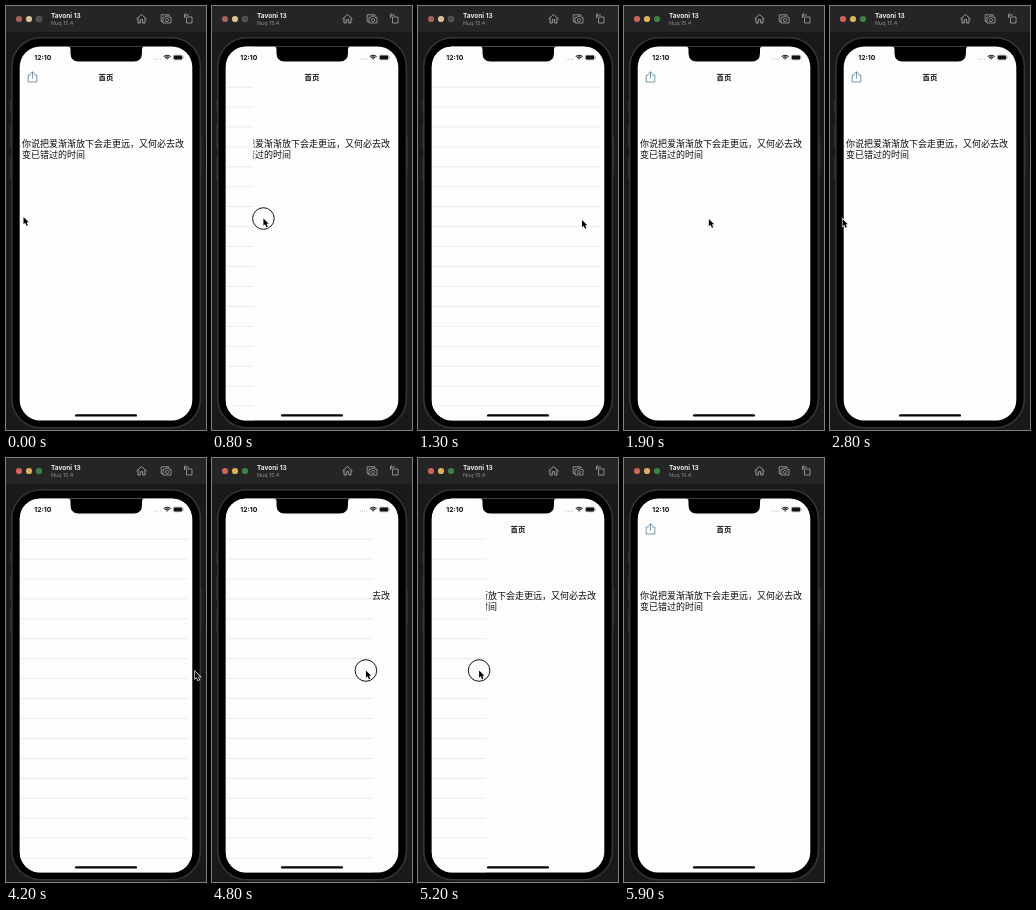
Recreate the animation shown at these times as an HTML page with a canvas. Size 200 px wide and 424 px high, loop 6 s.

```html
<!DOCTYPE html>
<html lang="zh">
<head>
<meta charset="utf-8">
<style>
  html, body { margin: 0; width: 100%; height: 100%; overflow: hidden; background: #19191b; }
  canvas { display: block; width: 200px; height: 424px; }
</style>
</head>
<body>
<canvas id="stage"></canvas>
<script>
const W = 200, H = 424, LOOP = 6000, STEP = 100;
const canvas = document.getElementById('stage');
const ctx = canvas.getContext('2d');
const ratio = window.devicePixelRatio || 1;
canvas.width = W * ratio;
canvas.height = H * ratio;

const LATIN = 'Inter, "Liberation Sans", sans-serif';
const CJK = '"Noto Sans CJK SC", "Noto Sans CJK", sans-serif';
const SCREEN = { x: 13.7, y: 40.5, w: 172.6, h: 374, r: 20.5 };
const CLOSED = 14, OPEN = 182, GRIP = 10, SNAP = 100;

// Eased pointer moves, each starting where the previous one ended
const START = { x: 17.5, y: 211 };
const moves = [
  { from: 0, to: 500, x: 12, y: 212 },
  { from: 600, to: 1200, x: 164, y: 214, drag: 'open' },
  { from: 1500, to: 1800, x: 95, y: 213, drag: 'close' },
  { from: 1800, to: 2200, x: 30, y: 213 },
  { from: 2200, to: 2800, x: 12.5, y: 213 },
  { from: 2900, to: 3700, x: 171, y: 218, drag: 'open' },
  { from: 3800, to: 4300, x: 191, y: 213 },
  { from: 4300, to: 4600, x: 175, y: 212.5 },
  { from: 4600, to: 5400, x: 40, y: 212.5, drag: 'close' }
];
const POINTER_GONE = 5600;

const clamp = (v, min, max) => Math.min(max, Math.max(min, v));
const mix = (a, b, k) => a + (b - a) * k;
const smooth = k => k * k * (3 - 2 * k);

function drawerUnder(move, startX, x) {
  const edge = move.drag === 'open' ? x - GRIP : x + OPEN - startX;
  return clamp(edge, CLOSED, OPEN);
}

// The drawer follows a drag, then snaps to its end position on release
function sceneAt(t) {
  let { x, y } = START, edge = CLOSED, pressed = false;
  for (const move of moves) {
    if (t < move.from) break;
    const k = smooth(clamp((t - move.from) / (move.to - move.from), 0, 1));
    const startX = x;
    x = mix(x, move.x, k);
    y = mix(y, move.y, k);
    if (move.drag) {
      pressed = t < move.to;
      const target = move.drag === 'open' ? OPEN : CLOSED;
      edge = mix(drawerUnder(move, startX, x), target, clamp((t - move.to) / SNAP, 0, 1));
    }
  }
  return { x, y, edge, pressed };
}

function roundRect(x, y, w, h, r, fill, stroke, width = 1) {
  ctx.beginPath();
  ctx.roundRect(x, y, w, h, r);
  if (fill) { ctx.fillStyle = fill; ctx.fill(); }
  if (stroke) { ctx.strokeStyle = stroke; ctx.lineWidth = width; ctx.stroke(); }
}

function disc(x, y, r, color) {
  ctx.fillStyle = color;
  ctx.beginPath();
  ctx.arc(x, y, r, 0, Math.PI * 2);
  ctx.fill();
}

function arc(x, y, r, color, width, from = 0, to = Math.PI * 2) {
  ctx.strokeStyle = color;
  ctx.lineWidth = width;
  ctx.beginPath();
  ctx.arc(x, y, r, from, to);
  ctx.stroke();
}

function label(text, x, y, font, color, align = 'left') {
  ctx.font = font;
  ctx.fillStyle = color;
  ctx.textAlign = align;
  ctx.fillText(text, x, y);
}

function strokePath(d, color, width) {
  ctx.strokeStyle = color;
  ctx.lineWidth = width;
  ctx.stroke(new Path2D(d));
}

function drawToolbar(t) {
  ctx.fillStyle = '#252526';
  ctx.fillRect(0, 0, W, 26);
  const lights = t < 1500 ? ['#a5635a', '#d9bf92', '#4b4e4e'] : ['#cf6259', '#dcb05c', '#3c8247'];
  lights.forEach((color, i) => disc(13 + i * 10, 13, 3.1, color));
  if (t < 1500) arc(33, 13, 3, '#686868', 0.5);
  label('Tavoni 13', 45, 12.3, `bold 6.5px ${LATIN}`, '#ededed');
  label('Nuq 15.4', 45, 19, `5.4px ${LATIN}`, '#8d8d8d');

  const grey = '#a6a6a6';
  strokePath('M130.5 13 L135.5 8.5 L140.5 13 M132 12 V17 H134.3 V13.7 H136.7 V17 H139 V12', grey, 0.9);
  strokePath('M157 15.5 H155.2 V8.8 H163 V10', grey, 0.8);
  strokePath('M157 11.3 H159 L159.8 10.2 H162.2 L163 11.3 H165 V17 H157 Z', grey, 0.8);
  arc(161, 14, 1.6, grey, 0.7);
  strokePath('M180.5 11 H186 V17 H180.5 Z M178.5 12 V9 H183 M180 7.3 L178.2 9 L180 10.7', grey, 0.8);
}

function drawPhone() {
  for (const [x, y, h] of [[3.8, 94, 11], [3.8, 119, 23], [3.8, 151, 23], [194.5, 131, 37]])
    roundRect(x, y, 1.8, h, 0.8, '#2c2c2e');
  roundRect(5.8, 31.8, 188.6, 390, 29, '#000', '#353537', 1.6);
  roundRect(SCREEN.x, SCREEN.y, SCREEN.w, SCREEN.h, SCREEN.r, '#fefefe');
}

function drawPage() {
  strokePath('M24.8 69 H22.2 V76 H30.8 V69 H28.2 M26.5 72.5 V65.8 M24.3 68 L26.5 65.7 L28.7 68', '#557f98', 0.8);
  label('首页', 100, 73.8, `bold 7.4px ${CJK}`, '#111', 'center');
  const font = `9px ${CJK}`;
  label('你说把爱渐渐放下会走更远，又何必去改', 16, 141.1, font, '#0a0a0a');
  label('变已错过的时间', 16, 151.8, font, '#0a0a0a');
}

function drawDrawer(edge) {
  if (edge <= CLOSED) return;
  const width = edge - SCREEN.x;
  ctx.fillStyle = '#fefefe';
  ctx.fillRect(SCREEN.x, SCREEN.y, width, SCREEN.h);
  ctx.fillStyle = '#e6e6e6';
  for (let i = 0; i < 17; i++) ctx.fillRect(SCREEN.x, 80.7 + i * 19.93, width, 0.8);
}

function drawStatus() {
  // Notch with flared upper corners
  ctx.fillStyle = '#000';
  ctx.fill(new Path2D('M61 40 Q64.5 40 64.5 43.5 V47 Q64.5 55.5 72.5 55.5 H128 Q136 55.5 136 47 V43.5 Q136 40 139.5 40 Z'));
  label('12:10', 28.3, 54, `bold 6.8px ${LATIN}`, '#111');
  for (let i = 0; i < 4; i++) disc(148.4 + i * 2, 53, 0.55, '#aaa');
  for (const r of [1.2, 3, 4.8]) arc(161.2, 54, r, '#111', 1.1, -Math.PI * 0.75, -Math.PI * 0.25);
  roundRect(167.3, 49.2, 9.3, 4.6, 1.3, null, '#777', 0.5);
  roundRect(167.8, 49.6, 8.3, 3.8, 0.8, '#111');
  ctx.fillStyle = '#999';
  ctx.fillRect(177.3, 50.7, 0.7, 1.6);
  roundRect(69, 408.2, 62, 2.4, 1.2, '#000');
}

function drawPointer({ x, y, pressed }) {
  if (pressed) arc(x, y, 10.8, '#111', 1);
  ctx.save();
  ctx.translate(x, y);
  const arrow = new Path2D('M0 0 V7.2 L1.7 5.7 L3 8.8 L4.4 8.2 L3.1 5.2 H5.3 Z');
  ctx.strokeStyle = '#fff';
  ctx.lineWidth = 1.2;
  ctx.stroke(arrow);
  ctx.fillStyle = '#000';
  ctx.fill(arrow);
  ctx.restore();
}

function render(t) {
  const scene = sceneAt(t);
  ctx.setTransform(ratio, 0, 0, ratio, 0, 0);
  ctx.fillStyle = '#19191b';
  ctx.fillRect(0, 0, W, H);
  drawToolbar(t);
  drawPhone();
  ctx.save();
  ctx.beginPath();
  ctx.roundRect(SCREEN.x, SCREEN.y, SCREEN.w, SCREEN.h, SCREEN.r);
  ctx.clip();
  drawPage();
  drawDrawer(scene.edge);
  drawStatus();
  ctx.restore();
  if (t < POINTER_GONE) drawPointer(scene);
}

const start = performance.now();
function tick() {
  const t = (performance.now() - start) % LOOP;
  render(Math.floor(t / STEP) * STEP);
  requestAnimationFrame(tick);
}
tick();
</script>
</body>
</html>
```
